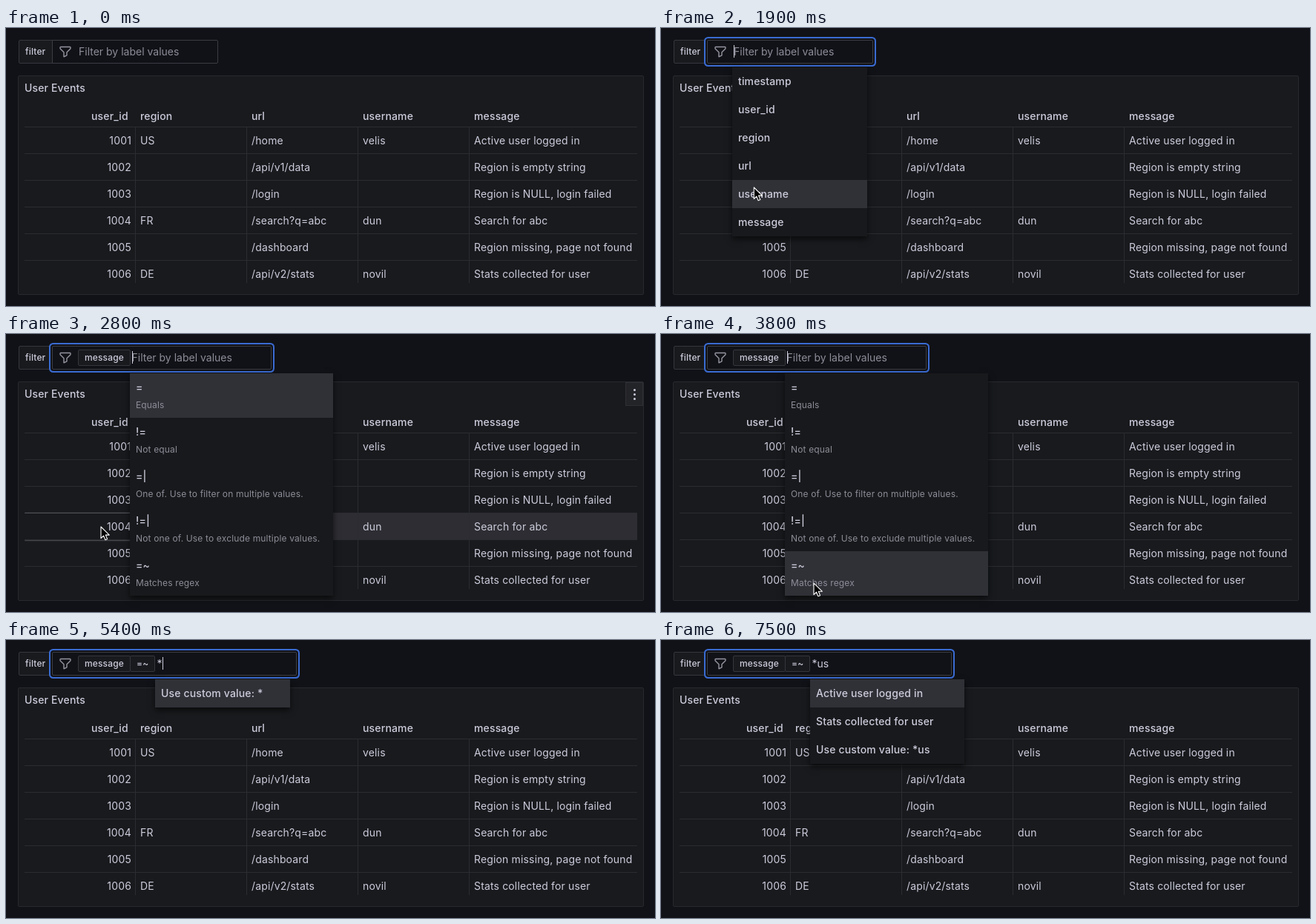
Animation, 875 px wide and 375 px high, one loop 8 s. Source, as an HTML page:

```html
<!DOCTYPE html>
<html lang="en">
<head>
<meta charset="utf-8">
<title>Label filter</title>
<style>
  * { box-sizing: border-box; }
  html, body { margin: 0; width: 100%; height: 100%; overflow: hidden; background: #111217; }
  body { position: relative; color: #ccccdc; font: 14px/36px Inter, sans-serif; letter-spacing: .15px; white-space: pre; }
  div, svg { position: absolute; }
  .strong { font-weight: 500; }
  #panel { left: 16px; top: 64px; width: 844px; height: 296px; background: #181a1d; border: 1px solid #28292e; border-radius: 2px; }
  #title { left: 25px; top: 63px; }
  #kebab { left: 835px; top: 65px; width: 24px; height: 32px; background: #232428; border: 1px solid #2e2f34; }
  #kebab div { left: 10px; width: 3px; height: 3px; border-radius: 50%; background: #ccccdc; }
  #table { left: 25px; top: 97px; width: 826px; height: 247px; overflow: hidden; }
  .row { left: 0; width: 826px; height: 37px; border-top: 1px solid #2b2c31; }
  .cell { top: 0; width: 150px; height: 36px; padding-left: 6px; border-left: 1px solid #2b2c31; }
  .cell:first-child { border: 0; text-align: right; padding-right: 6px; }
  .cell:last-child { width: 227px; }
  .over { background: #2d2d33; }
  .over .cell:first-child { background: #181a1d; box-shadow: 0 0 2px #a5a5b2; }
  #label { left: 17px; top: 16px; width: 46px; height: 32px; border: 1px solid #36373e; background: #181a1d; border-radius: 2px 0 0 2px; font-size: 12px; line-height: 30px; padding-left: 8px; }
  #input { left: 62px; top: 16px; height: 32px; border: 1px solid #3c3d44; background: #111217; border-radius: 0 2px 2px 0; }
  #input.focus { box-shadow: 0 0 0 2px #111217, 0 0 0 4px #3a6bd2; border-radius: 2px; }
  .chip { top: 21px; height: 22px; border: 1px solid #35363d; background: #191a1e; border-radius: 2px; font-size: 12px; line-height: 20px; padding-left: 8px; }
  .text { top: 14px; letter-spacing: 0; }
  .hint { color: #8d8d99; }
  .caret { display: inline-block; width: 1px; height: 17px; margin-right: -1px; vertical-align: -3px; background: #ccccdc; }
  .menu { top: 53px; overflow: hidden; background: #18191c; box-shadow: 0 4px 8px rgba(0, 0, 0, .6); }
  .item { left: 0; width: 100%; padding-left: 8px; line-height: 38px; }
  .item.on { background: #303137; }
  .note { left: 8px; top: 33px; line-height: 20px; font-size: 12px; font-weight: 400; color: #8d8d99; }
</style>
</head>
<body>
<div id="panel"></div>
<div id="title" class="strong">User Events</div>
<div id="table"></div>
<div id="kebab"><div style="top:8px"></div><div style="top:14px"></div><div style="top:20px"></div></div>
<div id="label" class="strong">filter</div>
<div id="input"></div>
<svg style="left:72px;top:24px" width="16" height="16" fill="none" stroke="#9595a1" stroke-width="1.4" stroke-linejoin="round">
  <path d="M1.8 1.5h12.4q.8 0 .8.8v1q0 .5-.4.9L10 8.8v4l-4 2v-6L1.4 4.2Q1 3.8 1 3.3v-1q0-.8.8-.8z"/>
</svg>
<div id="live"></div>
<svg id="cursor" width="16" height="21" viewBox="-1 -1 16 21">
  <path d="M0 0v15.5l3.6-3.4 2.3 5.6 2.7-1.1-2.3-5.5h5z" fill="#000" stroke="#fff" stroke-width="1.1" stroke-linejoin="round"/>
</svg>
<script>
const LOOP = 8000, MENU_TOP = 53;
const PICK_KEY = 600, PICK_OP = 2800, PICK_VALUE = 4600;
const typing = [[5400, '*'], [6300, '*u'], [7000, '*us']];
const caretResets = [PICK_KEY, PICK_OP, PICK_VALUE, ...typing.map(k => k[0])];

const fields = ['user_id', 'region', 'url', 'username', 'message'];
const rows = [
  ['1001', 'US', '/home', 'velis', 'Active user logged in'],
  ['1002', '', '/api/v1/data', '', 'Region is empty string'],
  ['1003', '', '/login', '', 'Region is NULL, login failed'],
  ['1004', 'FR', '/search?q=abc', 'dun', 'Search for abc'],
  ['1005', '', '/dashboard', '', 'Region missing, page not found'],
  ['1006', 'DE', '/api/v2/stats', 'novil', 'Stats collected for user']
];
const keys = ['timestamp', ...fields];
const operators = [
  ['=', 'Equals'],
  ['!=', 'Not equal'],
  ['=|', 'One of. Use to filter on multiple values.'],
  ['!=|', 'Not one of. Use to exclude multiple values.'],
  ['=~', 'Matches regex']
];
// start, end, from x, y, to x, y
const moves = [
  [0, 700, 150, -20, 114, 31],
  [1400, 2300, 114, 31, 128, 260],
  [3100, 4000, 128, 260, 210, 340]
];

const $ = id => document.getElementById(id);

$('table').innerHTML =
  fields.map((f, i) => `<div class="strong" style="top:4px;left:${i ? 6 + 150 * i : 90}px">${f}</div>`).join('') +
  rows.map((r, i) => `<div class="row" style="top:${36 + 36 * i}px">` +
    r.map((c, j) => `<div class="cell" style="left:${150 * j - (j ? 1 : 0)}px">${c}</div>`).join('') + '</div>').join('');
const rowNodes = [...document.querySelectorAll('.row')];

function pointer(t) {
  const [a, b, x0, y0, x1, y1] = moves.filter(m => m[0] <= t).pop();
  const p = Math.min(1, (t - a) / (b - a)), e = 1 - (1 - p) ** 2;
  return [x0 + (x1 - x0) * e, y0 + (y1 - y0) * e];
}

const chip = (x, w, s) => `<div class="chip strong" style="left:${x}px;width:${w}px">${s}</div>`;

function menu(x, w, h, step, on, items) {
  return `<div class="menu strong" style="left:${x}px;width:${w}px;height:${h}px">` +
    items.map(([name, note], i) =>
      `<div class="item${i === on ? ' on' : ''}" style="top:${i * step}px;height:${step}px">${name}` +
      (note ? `<div class="note">${note}</div>` : '') + '</div>').join('') + '</div>';
}

function valueMenu(typed) {
  const query = typed.slice(1).toLowerCase();
  let items = rows.map(r => r[4]);
  if (typed) {
    items = query ? items.filter(s => s.toLowerCase().includes(query)) : [];
    items.push('Use custom value: ' + typed);
  }
  const longest = Math.max(...items.map(s => s.length));
  return menu(201, Math.max(182, longest * 8 + 16), items.length * 38, 38, 0, items.map(s => [s]));
}

let shown = '';
function draw(t) {
  const [x, y] = pointer(t);
  const focus = t >= PICK_KEY, inOps = t >= PICK_OP && t < PICK_VALUE;
  const typed = (typing.filter(k => k[0] <= t).pop() || [0, ''])[1];
  const reset = caretResets.filter(c => c <= t).pop();
  const caret = focus && Math.floor((t - reset) / 500) % 2 === 0;
  let html = '', textX = 98;

  if (t >= PICK_VALUE) {
    textX = 203.5;
    html = chip(97, 71, 'message') + chip(167, 34, '=~') + valueMenu(typed);
  } else if (inOps) {
    textX = 169.5;
    html = chip(97, 71, 'message') +
      menu(167, 274, 300, 60, x < 167 ? 0 : Math.floor((y - MENU_TOP) / 60), operators);
  } else if (focus) {
    html = menu(96, 182, 228, 38, Math.max(0, Math.floor((y - MENU_TOP) / 38)), keys.map(k => [k]));
  }
  html += typed ? '' : `<div class="text hint" style="left:${textX}px">Filter by label values</div>`;
  html += `<div class="text" style="left:${textX}px">${typed}${caret ? '<span class="caret"></span>' : ''}</div>`;
  if (html !== shown) $('live').innerHTML = shown = html;

  $('input').className = focus ? 'focus' : '';
  $('input').style.width = Math.round(textX + 188) - 62 + 'px';

  const overTable = inOps && x < 167;
  const hovered = overTable ? Math.floor((y - 133) / 36) : -1;
  rowNodes.forEach((n, i) => n.classList.toggle('over', i === hovered));
  $('kebab').style.display = overTable ? '' : 'none';

  $('cursor').style.display = t < PICK_VALUE ? '' : 'none';
  $('cursor').style.transform = `translate(${x - 1}px, ${y - 1}px)`;
}

const start = performance.now();
function tick(now) {
  draw(Math.max(0, now - start) % LOOP);
  requestAnimationFrame(tick);
}
$('cursor').style.left = $('cursor').style.top = $('live').style.left = $('live').style.top = 0;
draw(0);
requestAnimationFrame(tick);
</script>
</body>
</html>
```
